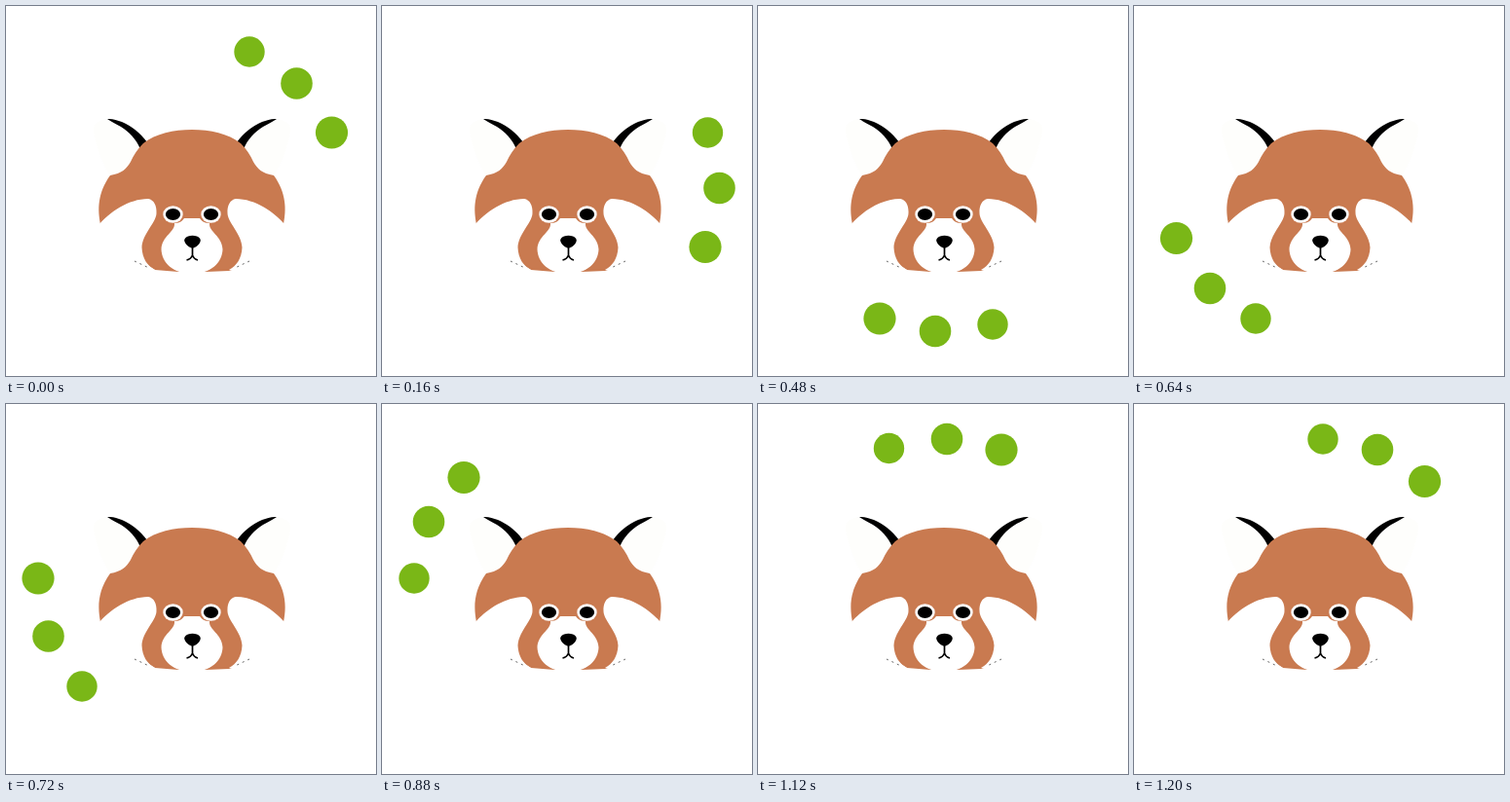
These frames come from a looping animation (380 by 380 pixels, 1.28 s). An HTML page:

```html
<!DOCTYPE html>
<html lang="en">
<head>
<meta charset="utf-8">
<title>Red panda loader</title>
<style>
html, body { margin: 0; width: 100%; height: 100%; overflow: hidden; background: #fff; }
svg { display: block; width: 100vw; height: 100vh; }
</style>
</head>
<body>
<svg viewBox="0 0 380 380">
  <defs>
    <g id="ear">
      <path fill="#fefefc" d="M104 116C96 117 89 121 90 128C93 146 99 162 107 174L128 166L142 145Z"/>
      <path d="M104 116C109 115.500 114 117 119 119C129 123.500 138 130 145 140L137.500 146C134 137 126 129 118 124C113 121 108 119 104 116Z"/>
    </g>
    <g id="cheek">
      <path fill="#fff" d="M96 224C106 212 126 198 146 198C152 199 155 205 154.500 213C154 223 140 234 139.500 248C140 259 145 267 153 271L140 275L90 250Z"/>
      <path fill="none" stroke="#222" stroke-width=".7" stroke-dasharray="2 4" d="M132 262L148 269.500"/>
    </g>
    <g id="eye">
      <ellipse cx="171.500" cy="214" rx="10.200" ry="8.700" fill="#fff"/>
      <ellipse cx="171.500" cy="214" rx="7.600" ry="6"/>
    </g>
  </defs>
  <use href="#ear"/>
  <use href="#ear" transform="matrix(-1 0 0 1 382 0)"/>
  <path fill="#c97a50" d="M97 224C94 209 94 192 107 174C119 172 124 167 128 160C131 153 135 147 141 141C154 131 172 127 191 127C210 127 228 131 241 141C247 147 251 153 254 160C258 167 263 172 275 174C288 192 288 209 285 224L243 262C240 268 236 271 229 272L205 273H177L153 271L139 262Z"/>
  <use href="#cheek"/>
  <use href="#cheek" transform="matrix(-1 0 0 1 382 0)"/>
  <path fill="#fff" d="M183 218H199C201 221 204 223 209 223C208 232 222 236 222.500 250C222 264 210 275 191 275C172 275 160 264 159.500 250C160 236 174 232 173 223C178 223 181 221 183 218Z"/>
  <use href="#eye"/>
  <use href="#eye" transform="matrix(-1 0 0 1 382 0)"/>
  <path d="M187 236.500Q191.500 235 196 236.500C199 237.500 200.500 240 199.500 242C198 246 194 248.500 191.500 248.500C189 248.500 185 246 183.500 242C182.500 240 184 237.500 187 236.500Z"/>
  <path fill="none" stroke="#000" stroke-width="1.700" d="M191.500 247V256.500M185.500 261Q190 260 191.500 256Q193 260 197 261"/>
  <g id="dots" fill="#7ab717"></g>
</svg>
<script>
const STEP = 80;
// stops around the ring, clockwise from the top
const stops = [
  [194, 36], [250, 47], [298.5, 79.5], [334.5, 130],
  [346.5, 187], [332, 247.5], [296.5, 295], [241, 327],
  [182, 334], [125, 321], [78, 290], [43.5, 238.5],
  [33, 179], [48, 121], [84, 75.5], [134.5, 45.5]
];
const radii = [15.7, 16.3, 16.6];
const group = document.getElementById('dots');
const dots = radii.map(r => {
  const dot = document.createElementNS('http://www.w3.org/2000/svg', 'circle');
  dot.setAttribute('r', r);
  return group.appendChild(dot);
});

function draw(time) {
  const step = Math.floor(time / STEP);
  dots.forEach((dot, i) => {
    const [x, y] = stops[(step + i + 1) % stops.length];
    dot.setAttribute('cx', x);
    dot.setAttribute('cy', y);
  });
}

const start = performance.now();
function tick() {
  draw(performance.now() - start);
  requestAnimationFrame(tick);
}
tick();
</script>
</body>
</html>
```
